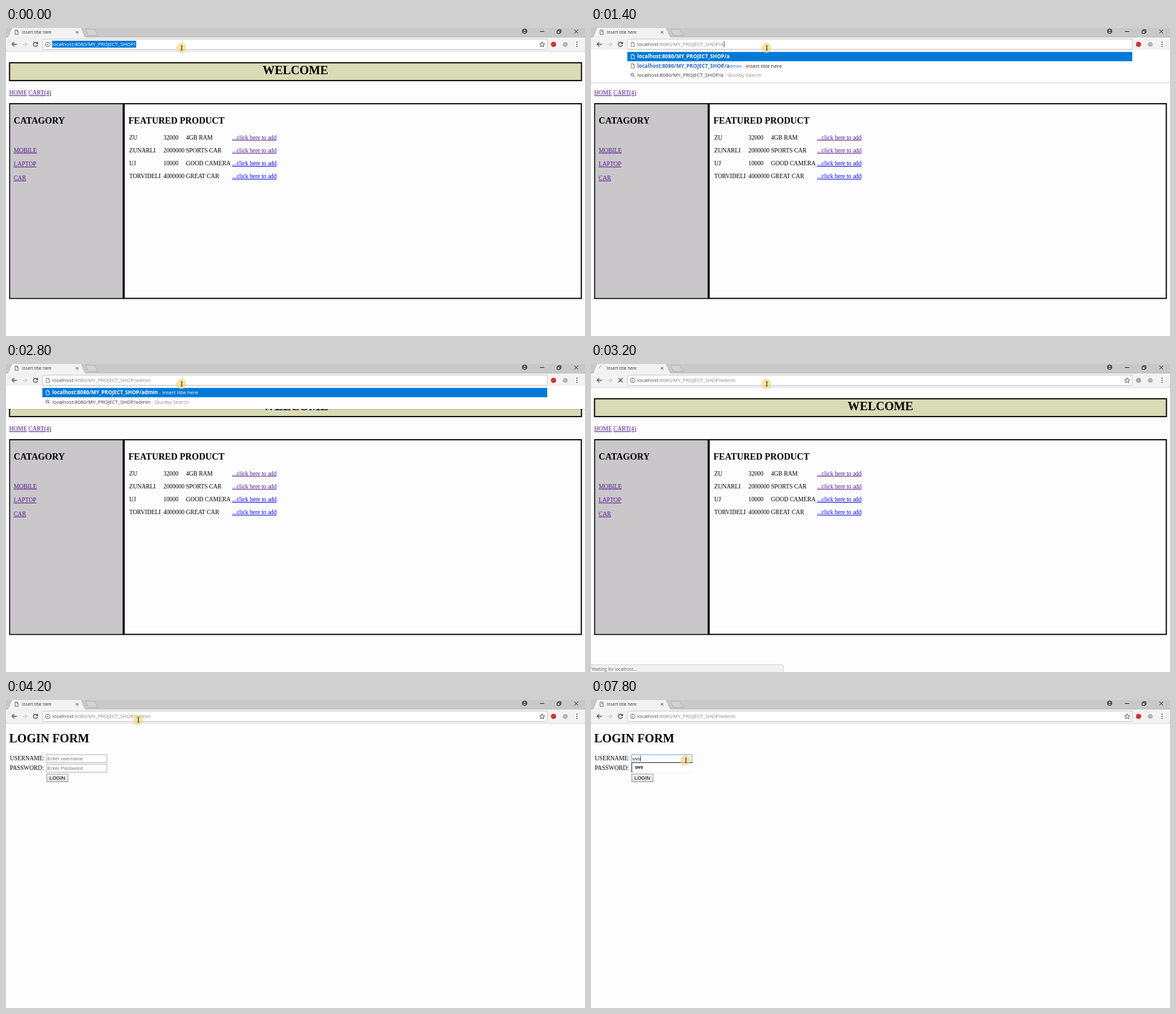
Recreate the animation shown at these times as an HTML page. Size 902 by 480 pixels, loop 8000 ms.

```html
<!DOCTYPE html>
<html lang="en">
<head>
<meta charset="utf-8">
<title>Insert title here</title>
<style>
  html, body { margin: 0; width: 100%; height: 100%; overflow: hidden; background: #fdfdfe; }
  svg { display: block; width: 902px; height: 480px; }
  text { white-space: pre; font: 9.4px "Liberation Serif", serif; }
  .ui { font: 7.86px "Open Sans", sans-serif; }
  .small { font-size: 6.5px; }
  .strong { font-weight: 700; font-size: 8.06px; }
  .entry { font: 700 6.69px "Open Sans", sans-serif; }
  .field { font: 7.83px "Liberation Sans", sans-serif; }
  .h1 { font-size: 18.8px; font-weight: 700; }
  .h2 { font-size: 14.1px; font-weight: 700; }
  .link { fill: #551a8b; text-decoration: underline; }
  .new { fill: #0000ee; }
  .line { fill: none; stroke: #444; stroke-width: 1; }
</style>
</head>
<body>
<svg viewBox="0 0 902 480">
  <defs>
    <linearGradient id="face" x2="0" y2="1"><stop stop-color="#f4f4f4"/><stop offset="1" stop-color="#dcdcdc"/></linearGradient>
    <linearGradient id="shade" x2="0" y2="1"><stop stop-color="#000" stop-opacity=".14"/><stop offset="1" stop-color="#000" stop-opacity="0"/></linearGradient>
    <g id="file"><path d="M-2.3-3.4H.6L2.5-1.5V3.4H-2.3ZM.6-3.4V-1.5H2.5" fill="none" stroke-width=".8"/></g>
    <g id="lens"><circle cx="-.7" cy="-.7" r="2.1" fill="none"/><path d="M.9.9 3.2 3.2"/></g>
  </defs>
  <rect width="902" height="480" fill="#fdfdfe"/>

  <g id="shop">
    <rect x="5.5" y="54.2" width="891" height="27.7" fill="#d9dbb6" stroke="#000" stroke-width="1.8"/>
    <text class="h1" x="451" y="72.3" text-anchor="middle">WELCOME</text>
    <text class="link" x="5" y="104">HOME</text>
    <text class="link" x="35" y="104">CART(4)</text>
    <rect x="5.8" y="118" width="890.5" height="303.4" fill="#fefdfe" stroke="#000" stroke-width="1.8"/>
    <rect x="6.6" y="118.9" width="176" height="301.6" fill="#c9c7c9"/>
    <path d="M183.3 118V421.4" stroke="#000" stroke-width="3.2"/>
    <text class="h2" x="12" y="148.5">CATAGORY</text>
    <text class="h2" x="190.7" y="148.5">FEATURED PRODUCT</text>
    <g id="goods"></g>
  </g>

  <g id="login">
    <text class="h1" x="5" y="66.2">LOGIN FORM</text>
    <text x="6" y="94.4">USERNAME:</text>
    <text x="6" y="109.4">PASSWORD:</text>
    <rect id="user" x="63.2" y="85.2" width="94" height="12.3" fill="#fff" stroke="#aaa" stroke-width=".9"/>
    <rect x="63.2" y="100.2" width="94" height="12.3" fill="#fff" stroke="#aaa" stroke-width=".9"/>
    <text class="field" id="name" x="64.5" y="93.6"></text>
    <text class="field" x="64.5" y="108.6" fill="#777">Enter Password</text>
    <rect x="63.3" y="115.3" width="33.5" height="12.2" fill="url(#face)" stroke="#999" stroke-width=".9"/>
    <text class="field" x="67.8" y="123.7">LOGIN</text>
    <path id="caret" stroke="#222" stroke-width=".8"/>
    <g id="entries"></g>
  </g>

  <g id="status">
    <path d="M-1 468.6H297Q299.5 468.6 299.5 471V481H-1Z" fill="#f1f1f1" stroke="#ccc" stroke-width=".8"/>
    <text class="ui" x="1.2" y="477.6" fill="#666" style="font-size:6.75px">Waiting for localhost...</text>
  </g>

  <rect width="902" height="14.5" fill="#c8c8c8"/>
  <path d="M0 14.2H3L9 0H117L123.5 14.2H902V36.3H0Z" fill="#f2f2f2"/>
  <path d="M0 14.2H3L9 0M117 0 123.5 14.2H902" class="line" style="stroke:#aaa;stroke-width:.7"/>
  <path d="M0 36.3H902" stroke="#d5d5d5" stroke-width=".9"/>
  <path d="M123.5 2H138.5L143 11.6H128.5Z" fill="#d3d3d3" stroke="#aaa" stroke-width=".8"/>
  <use id="tabFile" href="#file" x="16.5" y="6.5" stroke="#555"/>
  <path id="spinner" d="M13 6.5A3.5 3.5 0 0 1 16.5 3" class="line" style="stroke:#999"/>
  <text class="ui small" x="24.8" y="9" fill="#333">Insert title here</text>
  <path class="line" d="M108.8 4.7 112.7 8.6M112.7 4.7 108.8 8.6"/>
  <circle cx="808" cy="5" r="4" fill="#444"/>
  <circle cx="808" cy="3.8" r="1.4" fill="#c8c8c8"/>
  <path d="M805.4 7.5Q808 4.7 810.6 7.5Z" fill="#c8c8c8"/>
  <path class="line" style="stroke:#222" d="M832 5.5H838.5M858.5 4.2H863V8.5H858.5ZM860 4V2.6H864.5V7H863M885.4 2.6 891.2 8.4M891.2 2.6 885.4 8.4"/>
  <path class="line" style="stroke-width:1.2" d="M17 25.3H9.6M13 21.8 9.5 25.3 13 28.8"/>
  <path class="line" style="stroke:#ccc;stroke-width:1.2" d="M25.5 25.3H33M29.5 21.8 33 25.3 29.5 28.8"/>
  <g id="reload"><path class="line" style="stroke-width:1.2" d="M48.6 23.3A3.3 3.3 0 1 0 49.2 26.2"/><path d="M49.8 21.3V25H46.1Z" fill="#444"/></g>
  <path id="stop" class="line" style="stroke-width:1.2" d="M42.8 22.1 49.2 28.5M49.2 22.1 42.8 28.5"/>
  <rect x="56.8" y="17.3" width="786.4" height="16" rx="1" fill="#fff" stroke="#c4c4c4" stroke-width=".9"/>
  <g id="info" class="line" style="stroke-width:.8"><circle cx="65" cy="25.5" r="3.5"/><path d="M65 25V27.5M65 23.2V24.1"/></g>
  <use id="urlFile" href="#file" x="65" y="25.5" stroke="#666"/>
  <rect id="mark" x="71.6" y="19.8" width="131.2" height="10.8" fill="#0078d7"/>
  <text id="url" class="ui" x="72" y="28.2"></text>
  <path id="urlCaret" d="M207.4 20.5V30.3" stroke="#222" stroke-width=".8"/>
  <path id="star" class="line" style="stroke-width:.9" d="M835.3 21.5 836.5 24.2 839.3 24.5 837.2 26.4 837.8 29.2 835.3 27.7 832.8 29.2 833.4 26.4 831.3 24.5 834.1 24.2Z"/>
  <circle id="badge" cx="853" cy="25.5" r="4"/>
  <circle cx="871.3" cy="25.5" r="3.8" fill="#b5b5b5"/>
  <path d="M889.5 22.2V29.2" stroke="#444" stroke-width="1.7" stroke-linecap="round" stroke-dasharray="0 3.2"/>

  <g id="suggest"></g>

  <g id="pointer">
    <circle id="halo" cx="-.7" r="8" fill-opacity=".6"/>
    <path d="M-1.6-3.8Q0-3.8 0-3V3Q0 3.8-1.6 3.8M1.6-3.8Q0-3.8 0-3V3Q0 3.8 1.6 3.8" fill="none" stroke="#222" stroke-width=".7"/>
  </g>
</svg>
<script>
const $ = id => document.getElementById(id);
const show = (id, on) => $(id).style.display = on ? "" : "none";
const fill = (id, html) => { const el = $(id); if (el.key !== html) el.innerHTML = el.key = html; };
const text = (x, y, cls, body, extra = "") => `<text x="${x}" y="${y}" class="${cls}" ${extra}>${body}</text>`;
const span = (color, body, cls = "") => `<tspan fill="${color}" class="${cls}">${body}</tspan>`;

const LOOP = 8000, STEP = 200;
const HOST = "localhost", PATH = ":8080/MY_PROJECT_SHOP/", BASE = HOST + PATH, TITLE = "Insert title here";

// [start time, value] tables
const URL_TYPING = [[0, ""], [1400, "a"], [1600, "ad"], [1800, "adm"], [2200, "admi"], [2400, "admin"]];
const NAME_TYPING = [[0, ""], [7000, "u"], [7200, "uv"], [7600, "uvo"]];
const POINTER = [[0, 273.8, 31], [3600, 273.8, 31], [4200, 206.3, 31], [4800, 148, 104.5], [5400, 147.8, 94], [LOOP, 147.8, 94]];
const NAMES = ["tobil.vilut4173@zu.example", "uvo", "wolm", "ZK837", "vilut tobilo drames plon", "Tobilo8263"];
const GOODS = [
  ["ZU", "32000", "4GB RAM"],
  ["ZUNARLI", "2000000", "SPORTS CAR"],
  ["UJ", "10000", "GOOD CAMERA"],
  ["TORVIDELI", "4000000", "GREAT CAR"]
];

fill("goods", ["MOBILE", "LAPTOP", "CAR"].map((s, i) => text(12, 193.6 + i * 21.6, "link", s)).join("") +
  GOODS.map((row, i) => {
    const y = 173.6 + i * 20.2;
    return row.map((s, c) => text([192, 245.2, 280.4][c], y, "", s)).join("") +
      text(352.2, y, i < 2 ? "link" : "link new", "...click here to add");
  }).join(""));

const current = (table, t) => table.filter(row => row[0] <= t).pop()[1];

function pointerAt(t) {
  const i = POINTER.findIndex(p => p[0] > t);
  const [t0, x0, y0] = POINTER[i - 1], [t1, x1, y1] = POINTER[i];
  const k = (t - t0) / (t1 - t0);
  return [x0 + (x1 - x0) * k, y0 + (y1 - y0) * k];
}

function suggestions(typed) {
  const row = i => 44.5 + i * 14.5;
  const icon = (id, i, color) => `<use href="#${id}" x="65" y="${row(i)}" stroke="${color}"/>`;
  const line = (i, body) => text(72, row(i) + 2.8, "ui", body);
  const done = typed === "admin", last = done ? 1 : 2, bottom = done ? 70 : 84.5;
  let html = `<rect y="34" width="902" height="${bottom - 34}" fill="#fff"/>
    <rect y="${bottom}" width="902" height="2.5" fill="url(#shade)"/>
    <path d="M56.8 33.3H843.2" stroke="#c4c4c4" stroke-width=".9"/>
    <rect x="56.5" y="37.3" width="786.7" height="14.5" fill="#0078d7"/>` + icon("file", 0, "#fff") +
    line(0, span("#fff", BASE + typed, "strong") + (done ? span("#fff", " - " + TITLE) : ""));
  if (!done) html += icon("file", 1, "#666") + line(1, span("#2b67c4", BASE + typed, "strong") +
    span("#2b67c4", "admin".slice(typed.length)) + span("#888", " - ") + span("#222", TITLE));
  return html + icon("lens", last, "#555") +
    line(last, span("#333", BASE + typed) + span("#8a8a8a", " - Quolby Search"));
}

function entryList(t, typed) {
  if (t < 6000) return "";
  const names = typed ? ["uvo"] : NAMES;
  const right = typed ? 158.5 : 167.5, bottom = typed ? 112.8 : 183.5;
  return `<rect x="63.5" y="97.5" width="${right - 63.5}" height="${bottom - 97.5}" fill="#fefefe"/>
    <path d="M63.6 ${bottom}V97.6H${right}${typed ? "" : "V" + bottom}" fill="none" stroke="#222" stroke-width=".9"/>` +
    names.map((s, i) => text(68.7, 107 + i * 14.1, "entry", s)).join("");
}

function draw(t) {
  const editing = t >= 1400 && t < 3000, loading = t >= 3000 && t < 3800;
  const onLogin = t >= 3600, selected = t < 1400, focused = t >= 5800;
  const path = current(URL_TYPING, t), name = current(NAME_TYPING, t);

  show("shop", !onLogin);
  show("login", onLogin);
  show("status", t >= 3200 && t < 3800);
  for (const id of ["spinner", "stop"]) show(id, loading);
  for (const id of ["tabFile", "reload"]) show(id, !loading);
  for (const id of ["info", "star"]) show(id, !editing);
  show("urlFile", editing);
  show("mark", selected);
  show("urlCaret", path === "a");
  $("spinner").setAttribute("transform", `rotate(${(t - 3200) * .36} 16.5 6.5)`);
  $("badge").setAttribute("fill", loading ? "#aaa" : "#cf3434");
  fill("url", selected ? span("#fff", BASE) : span("#444", HOST) + span("#858585", PATH + path));
  fill("suggest", editing ? suggestions(path) : "");

  $("user").setAttribute("stroke", focused ? "#5b9bd8" : "#aaa");
  fill("name", name ? span("#222", name) : span("#777", "Enter username"));
  show("caret", focused && (name || t % 1000 < 500));
  const caretX = 64.6 + (name ? $("name").getComputedTextLength() : 0);
  $("caret").setAttribute("d", `M${caretX} 86.8V96`);
  fill("entries", entryList(t, name));

  $("pointer").setAttribute("transform", `translate(${pointerAt(t)})`);
  $("halo").setAttribute("fill", focused ? "#fbca78" : "#f5d36c");
}

const start = performance.now();
function tick() {
  const t = (performance.now() - start) % LOOP;
  draw(Math.floor(t / STEP) * STEP);
  requestAnimationFrame(tick);
}
tick();
</script>
</body>
</html>
```
